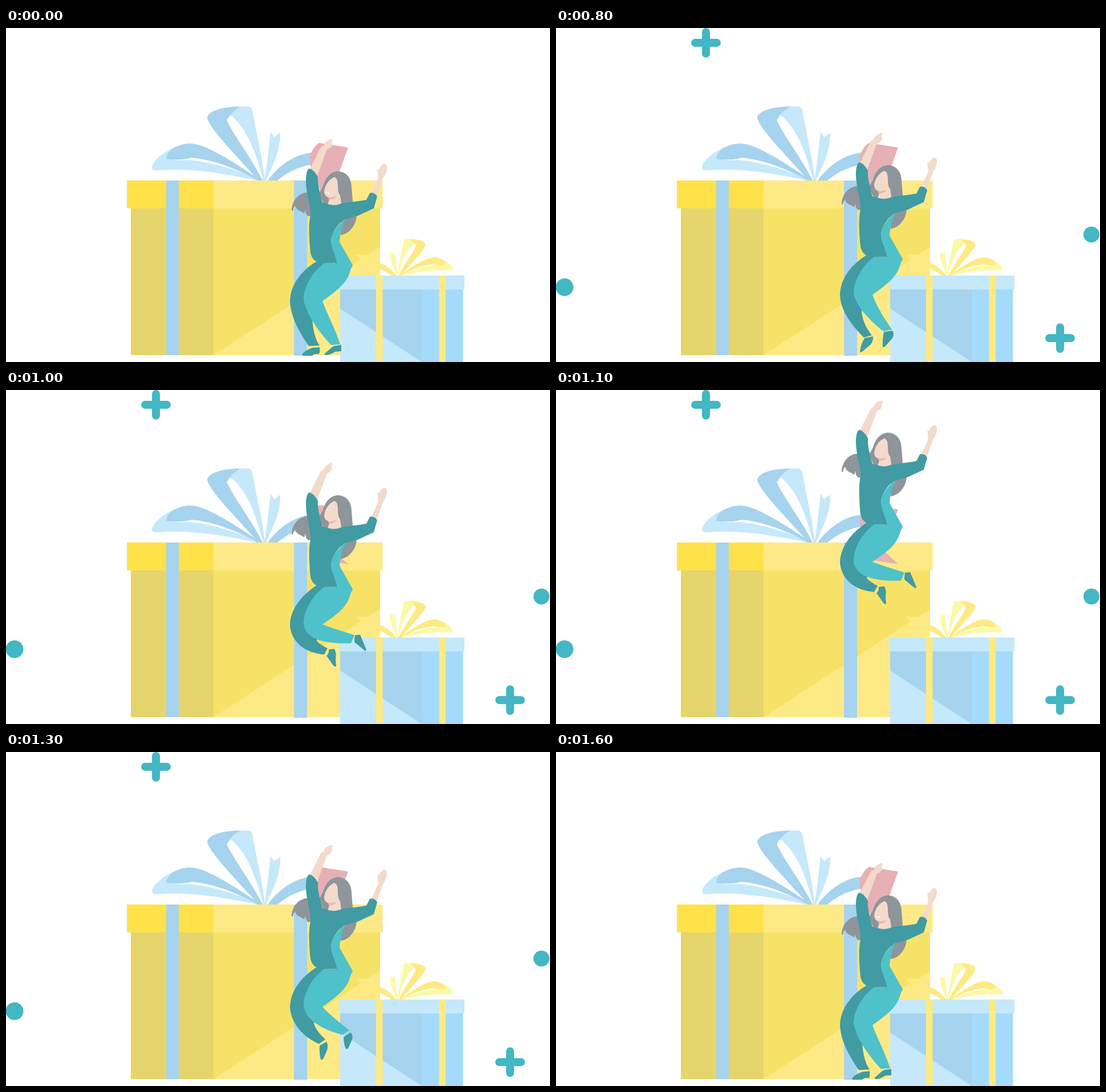
Animation of 954x587 px, one loop 1700 ms. Source, as an HTML page:

```html
<!DOCTYPE html>
<html lang="en">
<head>
<meta charset="utf-8">
<title>Jump for presents</title>
<style>
html, body { margin: 0; width: 100%; height: 100%; overflow: hidden; background: #fff; }
svg { display: block; width: 954px; height: 587px; }
.blue { --lite: #c6e8fb; --deep: #a6d3ed; }
.gold { --lite: #fbf9a6; --deep: #feea83; }
.lite { fill: var(--lite); }
.deep { fill: var(--deep); }
.teal { fill: #419ba3; }
.aqua { fill: #4fc1ca; }
.skin { fill: #f3dacb; }
.hair { fill: #8e959b; }
.sparks { fill: #43b7c3; stroke: #43b7c3; stroke-linecap: round; }

.body, .pose, .smile, .plus, .dots { animation: 1.7s step-end infinite; }
.pose, .plus, .dots { visibility: hidden; }
.body { animation-name: jump; }
.stand { animation-name: stand; }
.hop { animation-name: hop; }
.lift { animation-name: lift; }
.tuck { animation-name: tuck; }
.smile { animation-name: smile; }
.plus { animation-name: plus; }
.dots { animation-name: dots; }

@keyframes jump {
  0%, 88.23%, 100% { transform: translateY(0); }
  47.05%, 82.35% { transform: translateY(-11px); }
  52.94%, 76.47% { transform: translateY(-32px); }
  58.82%, 70.58% { transform: translateY(-67px); }
  64.7% { transform: translateY(-177px); }
}
@keyframes stand {
  0%, 94.11%, 100% { visibility: visible; }
  23.52% { visibility: hidden; }
}
@keyframes hop {
  0%, 52.94%, 94.11%, 100% { visibility: hidden; }
  23.52%, 82.35% { visibility: visible; }
}
@keyframes lift {
  0%, 58.82%, 82.35%, 100% { visibility: hidden; }
  52.94%, 76.47% { visibility: visible; }
}
@keyframes tuck {
  0%, 76.47%, 100% { visibility: hidden; }
  58.82% { visibility: visible; }
}
@keyframes smile {
  0%, 82.35%, 100% { visibility: visible; }
  47.05% { visibility: hidden; }
}
@keyframes plus {
  0%, 94.11%, 100% { visibility: hidden; }
  23.52% { visibility: visible; }
}
@keyframes dots {
  0%, 88.23%, 100% { visibility: hidden; }
  47.05% { visibility: visible; }
}
</style>
</head>
<body>
<svg viewBox="0 0 954 587">
  <defs>
    <g id="bow">
      <path class="lite" d="M300 208C275 217 256 235 256 246Q257 251 266 250C330 246 385 256 440 268H447C410 250 350 233 318 232C300 233 285 231 281 228Z"/>
      <path class="deep" d="M281 230C282 215 300 204 322 203C350 203 395 233 448 268H442C410 250 365 231 325 228C315 232 290 232 281 230Z"/>
      <path class="deep" d="M411 138C375 138 353 148 353 158C356 175 395 215 443 268H450C430 228 400 190 387 162Q395 148 411 138Z"/>
      <path class="lite" d="M411 138H426Q432 140 433 150C440 190 450 230 454 268H451C440 225 425 180 396 155Q390 154 387 160Q395 148 411 138Z"/>
      <path class="lite" d="M464 182L470 192L481 184C482 215 468 240 456 268H453C458 240 461 210 464 182Z"/>
      <path class="deep" d="M540 219C505 220 475 245 459 268H476C495 252 515 243 545 238Z"/>
    </g>
    <path id="cross" d="M-19 0H19M0-19V19" stroke-width="14"/>
  </defs>

  <!-- large present -->
  <path fill="#e6d56c" d="M219 317H364V575H219Z"/>
  <path fill="#f7e268" d="M364 317H656V575H364Z"/>
  <path fill="#fdea86" d="M364 575L656 385V575Z"/>
  <path fill="#ffe24a" d="M212 268H364V317H212Z"/>
  <path fill="#fdea86" d="M364 268H660.500V317H364Z"/>
  <path fill="#a6d3ed" d="M281 268H303V575H281ZM505 268H528V576H505Z"/>
  <use href="#bow" class="blue"/>
  <path fill="#e6b0b5" d="M549 202L600 210L574 282L600 306L560 300Q528 250 534 222Q540 207 549 202Z"/>

  <!-- small present -->
  <path fill="#feea83" d="M613 398L634 399L656 410V420H605L621 406Z"/>
  <use href="#bow" class="gold" transform="translate(687 435) scale(-.488 .492) translate(-453 -268)"/>
  <path fill="#a6d3ed" d="M586 459H729V587H586Z"/>
  <path fill="#a4dbfb" d="M729 459H801.500V587H729Z"/>
  <path fill="#c6e8fb" d="M586 493L729 587H586ZM584 435H804V459.500H584Z"/>
  <path fill="#feea83" d="M649 435H660.500V587H649ZM759.500 435H771V587H759.500Z"/>

  <g class="body">
    <path class="hair" d="M501 321C501 305 512 290 528 289L542 330L530 331C526 328 525 324 525 319L523 326C515 320 509 321 507 312Q504 315 503 321Z"/>
    <path class="hair" d="M583 252C570 252 560 262 556 278L549 290L557 309L588 320L587 364C598 362 605 356 611 345C617 332 616 320 608 305L606 280C606 265 598 253 583 252Z"/>
    <path class="skin" d="M576 262C581 264 582 270 582 278C582 288 584 292 586 294L588 308L575 314L564 310L568 298C560 297 558 292 558 286C560 275 566 266 576 262Z"/>
    <path fill="#e9b9ab" d="M564 298Q573 298 580 295Q577 301 567 302Z"/>
    <path class="smile" d="M561 288Q564 291 568 290" fill="none" stroke="#fff" stroke-width="1.500"/>
    <path class="skin" d="M533 248L552 210L558 206Q558 199 571 195Q574 197 571 201Q573 206 569 210Q566 214 563 213L546 260Z"/>
    <path class="skin" d="M640 292L653 263L651 249L655 247Q658 241 663 238Q669 240 668 248Q666 258 661 264L650 296Z"/>

    <g class="pose stand">
      <path class="teal" d="M545 410C520 425 498 450 498 482C500 510 515 535 531 559L550 558C541 545 538 527 537 510L560 412Z"/>
      <path class="aqua" d="M560 412C540 425 522 452 522 478C526 500 545 530 570 557L586 556C578 530 562 500 555 480C575 465 595 452 602 432L606 420L582 414Z"/>
      <path class="teal" d="M519 575C522 568 530 565 537 562L550 561Q551 568 549 573Q540 572 537 576H521Z"/>
      <path class="teal" d="M558 573C565 567 570 562 575 559L588 557V568L577 569Q570 574 561 575Z"/>
    </g>
    <g class="pose hop">
      <path class="teal" d="M545 410C520 425 498 450 498 482C500 510 520 535 540 555L554 551C545 540 538 527 536 510L560 412Z"/>
      <path class="aqua" d="M560 412C540 425 522 452 522 478C526 500 550 525 574 544L589 541C578 525 562 500 555 480C575 465 595 452 602 432L606 420L582 414Z"/>
      <path class="teal" d="M541 556L556 553Q557 560 552 567L537 580L533 581Q533 570 541 556Z"/>
      <path class="teal" d="M575 545L590 543Q594 549 590 556L577 571L573 572Q572 560 575 545Z"/>
    </g>
    <g class="pose lift">
      <path class="teal" d="M545 410C518 427 498 452 498 482C501 511 522 533 549 545L560 537C551 528 543 520 540 509L560 412Z"/>
      <path class="aqua" d="M560 412C540 425 522 452 522 478C525 503 555 520 590 529L602 521C587 509 567 493 555 480C575 465 595 452 602 432L606 420L582 414Z"/>
      <path class="teal" d="M550 548L562 541Q566 548 563 556L556 572L552 573Q549 560 550 548Z"/>
      <path class="teal" d="M592 533L604 525Q609 530 607 537L600 553L596 554Q592 545 592 533Z"/>
    </g>
    <g class="pose tuck">
      <path class="teal" d="M545 410C515 430 498 455 498 482C502 512 525 529 558 532L564 521C555 516 548 512 545 508L560 412Z"/>
      <path class="aqua" d="M560 412C540 425 522 452 522 478C524 505 560 514 605 512L611 498C595 492 572 486 555 479C575 465 595 452 602 432L606 420L582 414Z"/>
      <path class="teal" d="M566 523L576 522Q580 530 578 540L579 552Q577 555 574 551L562 534Q567 530 566 523Z"/>
      <path class="teal" d="M612 498L621 497L631 521Q633 526 629 525L611 510Q611 503 612 498Z"/>
    </g>

    <path class="teal" d="M531 247C524 255 525 275 530 300C533 315 535 322 534 330C530 345 532 375 534 395C536 405 541 409 546 411L560 413Q572 412 581 414C578 395 572 385 570 375C571 360 580 347 592 337L617 330L645 317L651 296Q646 288 638 290L632 302C615 305 600 306 590 308C580 312 570 312 564 309L555 307C550 290 546 272 547 262Q540 248 531 247Z"/>
    <path class="aqua" d="M593 337C578 350 570 362 570 378C572 390 578 400 581 414L606 421Q609 419 607 415L585 376C586 360 590 345 596 336Z"/>
  </g>

  <g class="sparks">
    <g class="plus">
      <use href="#cross" x="263" y="26"/>
      <use href="#cross" x="884" y="545"/>
    </g>
    <g class="dots" stroke="none">
      <circle cx="15" cy="455.500" r="15.500"/>
      <circle cx="939" cy="363" r="14"/>
    </g>
  </g>
</svg>
</body>
</html>
```
